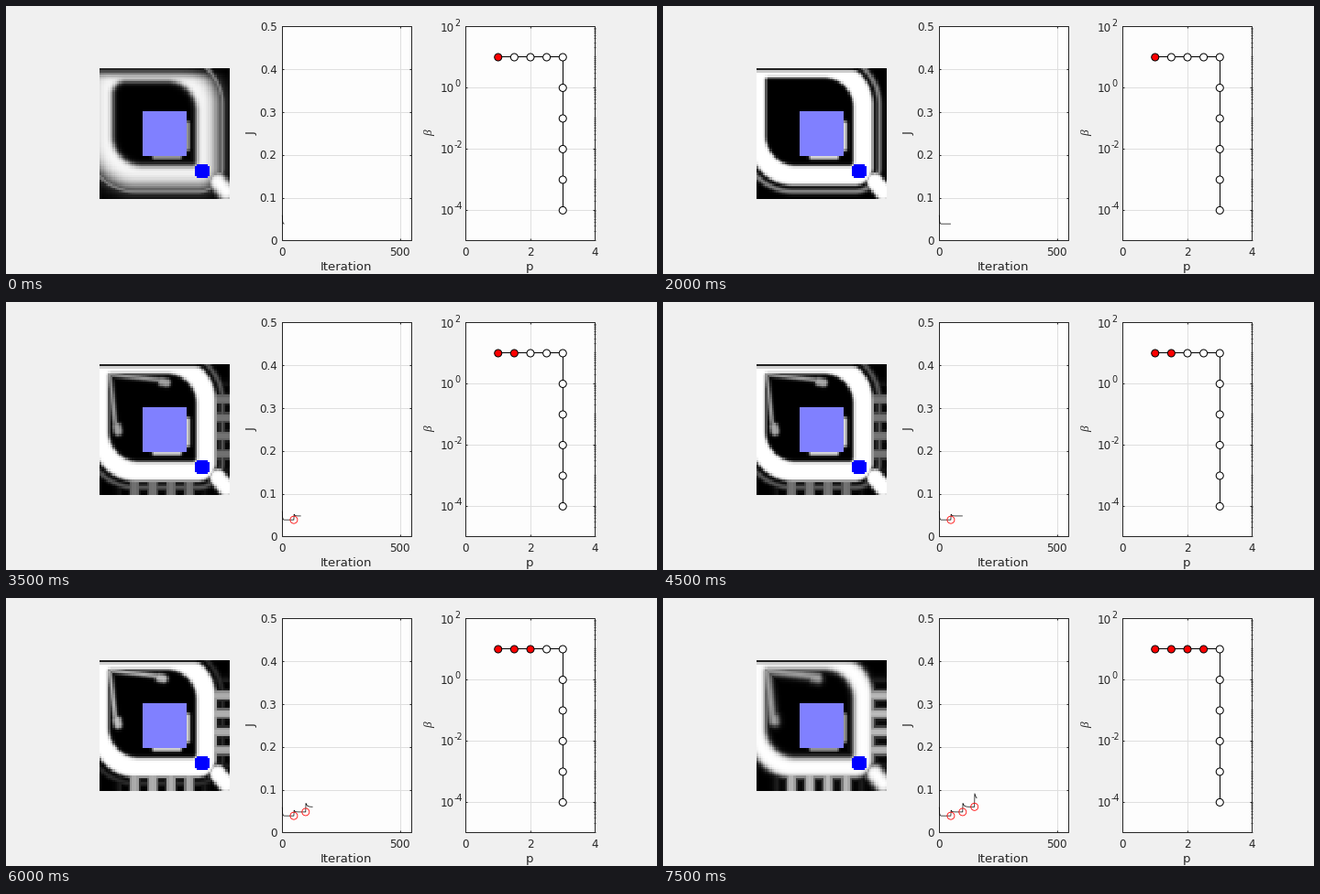
These frames come from a looping animation (710 by 293 pixels, 8 s). A matplotlib script:

```python
import numpy as np
import matplotlib.pyplot as plt
from matplotlib.animation import FuncAnimation
from matplotlib.patches import Circle, Rectangle

W, H, FRAMES, STEP = 710, 293, 16, 500
PT = 0.72  # points per pixel at 100 dpi
INK, GRID, PAPER = "#262626", "#dfdfdf", "#fdfdfd"
PER_FRAME, PER_STAGE = 10, 50  # iterations

fig = plt.figure(figsize=(W / 100, H / 100), dpi=100, facecolor="#f0f0f0")
ax = fig.add_axes([0, 0, 1, 1])
ax.set_axis_off()


def line(xs, ys, color=INK, width=1, z=2):
    return ax.plot(xs, ys, color=color, lw=width * PT, zorder=z,
                   solid_capstyle="butt")[0]


def label(x, y, s, size=12, ha="center", va="baseline", **kw):
    kw.setdefault("family", "DejaVu Sans")
    ax.text(x, y, s, fontsize=size * PT, color=INK, ha=ha, va=va, **kw)


def block(x, y, w, h, color, z):
    ax.add_patch(Rectangle((x, y), w, h, fc=color, ec="none", zorder=z))


def ring(x, y, color, edge, width):
    return ax.add_patch(Circle((x, y), 4, fc=color, ec=edge, lw=width * PT, zorder=5))


# Plot panels
TOP, BOTTOM, PANEL_W = 22, 256.4, 141
LEFT_J, LEFT_P = 301, 501


def iter_x(i):
    return LEFT_J + 0.258 * i


def cost_y(j):
    return BOTTOM - (BOTTOM - TOP) * j / 0.5


def p_x(p):
    return LEFT_P + PANEL_W * p / 4


def beta_y(e):
    return BOTTOM - (BOTTOM - TOP) * (e + 5) / 7


def panel(x0, xticks, yticks):
    """Plot box with grid lines and short inward ticks."""
    x1 = x0 + PANEL_W
    block(x0, TOP, PANEL_W, BOTTOM - TOP, PAPER, 0)
    for x in xticks:
        line([x, x], [TOP, BOTTOM], GRID, z=1)
        line([x, x], [TOP, TOP + 2])
        line([x, x], [BOTTOM - 2, BOTTOM])
    for y in yticks:
        line([x0, x1], [y, y], GRID, z=1)
        line([x0, x0 + 2], [y, y])
        line([x1 - 2, x1], [y, y])
    line([x0, x1, x1, x0, x0], [TOP, TOP, BOTTOM, BOTTOM, TOP], z=3)


tenths = np.arange(6) / 10
decades = range(2, -5, -2)

panel(LEFT_J, [iter_x(500)], cost_y(tenths[1:5]))
for j in tenths:
    label(295.5, cost_y(j) + 4.8, f"{j:g}", ha="right")
for i in (0, 500):
    label(iter_x(i) - 0.5, 273, str(i))
label(371.5, 289, "Iteration", 13.2)
label(268, 139.5, "J", 13.2, va="center", rotation=90)

panel(LEFT_P, [p_x(2)], [beta_y(e) for e in decades[1:]])
for e in range(-5, 2):
    for y in beta_y(e + np.log10(np.arange(1, 10))):
        line([641, 643], [y, y], width=0.8)
for e in decades:
    label(488.8, beta_y(e) + 5.5, "10", ha="right")
    label(489, beta_y(e) - 0.5, str(e), 9.6, ha="left")
for p in (0, 2, 4):
    label(p_x(p), 273, str(p))
label(571.5, 289, "p", 13.2)
label(462, 138.5, "\u03b2", 13.2, va="center", rotation=90,
      family="Liberation Serif", style="italic")

path = [(1 + n / 2, 1) for n in range(5)] + [(3, e) for e in range(0, -5, -1)]
line([p_x(p) for p, _ in path], [beta_y(e) for _, e in path], "black", z=4)
dots = [ring(p_x(p) + 0.5, beta_y(e) + 0.5, "white", "black", 1) for p, e in path]


def cost(i):
    """Each stage starts with a jump and settles on a higher level."""
    n, t = np.divmod(np.asarray(i) - 1, PER_STAGE)
    level = 0.04 + 0.0075 * n + 0.0015 * n ** 2
    jump = np.where(n == 0, 0.02, 0.004 + 0.002 * (n - 1) * n)
    return level + jump * np.exp(-t / (1.5 + 2 * n))


curve = line([], [], "black", 0.7, z=4)
ends = [ring(iter_x(i), cost_y(cost(i)) + 0.5, "none", "red", 0.8)
        for i in (50, 100, 150)]

# Material layout: mirror-symmetric about its main diagonal
X0, Y0, SIDE, CELLS = 102, 68, 142, 60
mid = (np.arange(CELLS) + 0.5) * SIDE / CELLS
U, V = np.meshgrid(mid, mid)


def solid(d, soft):
    """Density from signed distance, 1 inside and 0 outside."""
    return 1 / (1 + np.exp(np.clip(d / soft, -30, 30)))


def bar(x0, y0, x1, y1, r):
    """Signed distance to a capsule."""
    dx, dy = x1 - x0, y1 - y0
    t = np.clip(((U - x0) * dx + (V - y0) * dy) / (dx * dx + dy * dy), 0, 1)
    return np.hypot(U - x0 - t * dx, V - y0 - t * dy) - r


def rounded(lo, hi, near, side, far):
    """Signed distance to a square with its own radius at each kind of corner."""
    c, h = (lo + hi) / 2, (hi - lo) / 2
    x, y = U - c, V - c
    r = np.where(x * y < 0, side, np.where(x < 0, near, far))
    qx, qy = abs(x) - h + r, abs(y) - h + r
    return np.hypot(np.maximum(qx, 0), np.maximum(qy, 0)) \
        + np.minimum(np.maximum(qx, qy), 0) - r


def density(k):
    stage, s = divmod(k, PER_STAGE // PER_FRAME)
    fresh = np.exp(-s)            # each stage restarts blurred
    young = fresh * (stage == 0)
    grown = stage / 3
    soft = 0.8 + 0.9 * fresh

    hole = rounded(10 + 4 * young, 106, 3 + 12 * young, 33, 5)
    shell = rounded(-8, 127, 0, 48, 20)
    loop = solid(shell - 2 * young, soft + 3.5 * young) * (1 - solid(hole, soft))
    loop *= solid(2.5 + 3 * young - V, 0.7 + 2 * young)
    foot = solid(bar(129, 123, 138, 134, 9), soft)

    # faint outer layer that breaks up into spokes
    halo = 0.5 * (1 - grown) * np.exp(-((shell - 7) / 3) ** 2)
    comb = 0.5 + 0.5 * np.cos(2 * np.pi * (V - 38) / 20)
    comb = solid((0.5 - comb) / (0.5 + 0.3 * fresh), 0.2)
    reach = solid(abs(V - 68) - 42, 3) * solid(116 - U, 1)
    spokes = 0.9 * grown ** 0.6 * (1 - 0.15 * fresh) * comb * reach

    # inner branch that shortens to a knob
    tip = 76 - 3 * stage
    arm = np.maximum(solid(bar(11, 12, 18, tip, 2 + 2 * fresh), soft),
                     solid(bar(19, tip - 5, 20, tip, 4.5), soft))
    arm *= min(stage, 1) * (0.55 + 0.35 * grown) * (1 - 0.25 * fresh)

    rim = (0.95 - 0.3 * fresh) * solid(bar(96.5, 60, 96.5, 87, 2.3), 0.8)
    half = np.max([halo, spokes, arm, rim], axis=0)
    return np.max([loop, foot, half, half.T], axis=0)


image = ax.imshow(np.zeros((CELLS, CELLS)), cmap="gray", vmin=0, vmax=1,
                  interpolation="nearest", aspect="auto", zorder=1,
                  extent=(X0, X0 + SIDE, Y0 + SIDE + 1, Y0))
block(149, 115, 48, 49, "#8080ff", 2)
block(206, 175, 16, 11, "#0000ff", 3)
block(208, 173, 12, 15, "#0000ff", 3)
ax.set_xlim(0, W)
ax.set_ylim(H, 0)


def draw(k):
    image.set_data(density(k))
    its = np.arange(1, PER_FRAME * (k + 1) + 1)
    curve.set_data(iter_x(its), cost_y(cost(its)) + 0.5)
    stage = k * PER_FRAME // PER_STAGE
    for n, end in enumerate(ends):
        end.set_visible(n < stage)
    for n, dot in enumerate(dots):
        dot.set_facecolor("red" if n <= stage else "white")
    return [image, curve, *ends, *dots]


anim = FuncAnimation(fig, draw, frames=FRAMES, interval=STEP, repeat=True,
                     repeat_delay=0, init_func=lambda: draw(0))
plt.show()
```
